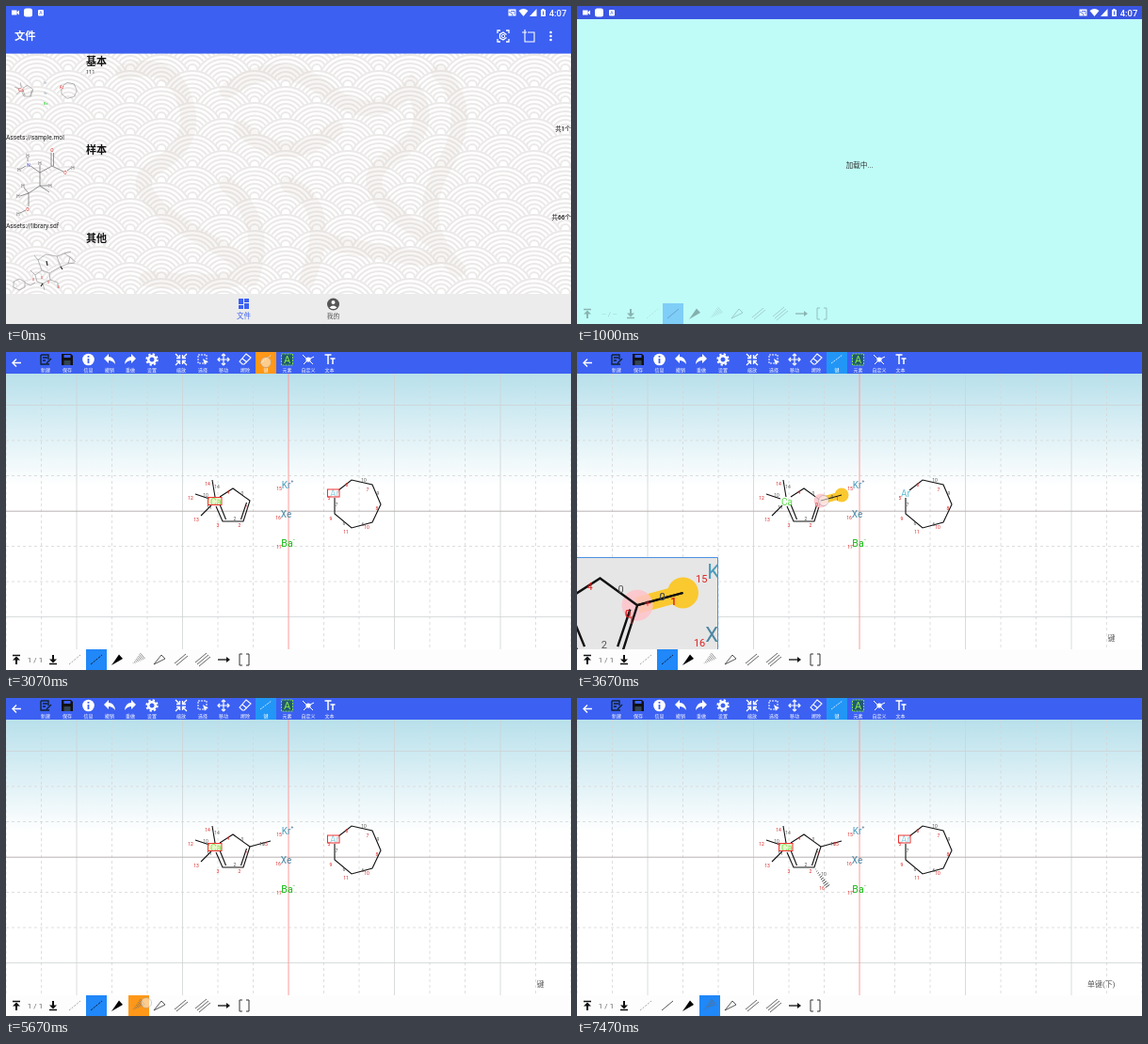
Recreate the animation shown at these times as an HTML page. Size 600 px wide and 338 px high, loop 8000 ms.

```html
<!DOCTYPE html>
<html lang="zh-CN">
<head>
<meta charset="utf-8">
<title>分子编辑器</title>
<style>
html, body { margin: 0; width: 100%; height: 100%; overflow: hidden; background: #fff; }
svg { display: block; width: 100%; height: 100%; font-family: Roboto, "Noto Sans CJK SC", "Noto Sans CJK", sans-serif; }
</style>
</head>
<body>
<svg id="stage" viewBox="0 0 600 338"></svg>
<script>
const LOOP = 8000, FPS = 15, ZOOM = 2.2;
const BLUE = '#3c60f2', PICK = '#2088f8', PRESS = '#ff9818', GOLD = '#fac82f', RED = '#d22', GREEN = '#2c2';

const text = (s, x, y, size, fill = '#111', anchor = 'middle', extra = '') =>
  `<text x="${x}" y="${y + size * 0.36}" font-size="${size}" fill="${fill}" text-anchor="${anchor}" ${extra}>${s}</text>`;
const path = (d, stroke = '#111', width = 1, extra = '') =>
  `<path d="${d}" fill="none" stroke="${stroke}" stroke-width="${width}" ${extra}/>`;
const solid = (d, fill = '#fff') => `<path d="${d}" fill="${fill}"/>`;
const rect = (x, y, w, h, fill, extra = '') =>
  `<rect x="${x}" y="${y}" width="${w}" height="${h}" fill="${fill}" ${extra}/>`;
const disc = (x, y, r, fill, extra = '') => `<circle cx="${x}" cy="${y}" r="${r}" fill="${fill}" ${extra}/>`;
const group = (id, body, extra = '') => `<g id="${id}" ${extra}>${body}</g>`;
const at = (x, y, body) => `<g transform="translate(${x} ${y})">${body}</g>`;
const range = n => [...Array(n).keys()];

// Widening strokes across the line from a to b.
function hash([ax, ay], [bx, by], half, n = 10) {
  const dx = bx - ax, dy = by - ay, len = Math.hypot(dx, dy);
  return range(n).map(i => {
    const k = (i + 1) / n, w = half * k / len, x = ax + dx * k, y = ay + dy * k;
    return `M${x - dy * w} ${y + dx * w}L${x + dy * w} ${y - dx * w}`;
  }).join('');
}

function waves() {
  const rings = range(7).flatMap(k => range(3).map(i => {
    const x = 66 * i + (k % 2 ? 33 : 0) - 33, y = 17 * k;
    return disc(x, y, 33, '#fff') + [32, 27.5, 23, 18.5, 14, 9.5, 5].map(r =>
      disc(x, y, r, 'none', 'stroke="#ebe9e8" stroke-width="2"')).join('');
  })).join('');
  return `<pattern id="waves" width="66" height="34" y="50" patternUnits="userSpaceOnUse">${rings}</pattern>`;
}

const statusBar = () =>
  rect(6, 4.5, 5.5, 5, '#fff') + solid('M11 7L14 4.5V9.5Z') + rect(19, 2.5, 9, 9, '#fff', 'rx="2.5"') +
  rect(34, 4, 6, 6.5, '#fff', 'rx="1"') + text('A', 37, 7.2, 5, BLUE) +
  rect(533.5, 3.5, 8, 7, '#fff') + path('M534 6.5A4 4 0 0 1 538 10.5M536 5.5H540V9', BLUE, .8) +
  solid('M544.5 5Q549.5 1 554.5 5L549.5 11Z') + solid('M556 11H563.5V3Z') +
  solid('M568 4H569V3H571.5V4H573V11H568Z') + path('M570.5 5.5V9.5', BLUE) +
  text('4:07', 586, 7.3, 9.5, '#fff', 'middle', 'font-weight="500"');

function row(i, title, count, file) {
  const y = 50 + 94.2 * i;
  return text(title, 85, y + 8.6, 11, '#111', 'start', 'font-weight="700"') +
    text(count, 600, y + 80.5, 6.5, '#111', 'end', 'font-weight="500"') + text(file, 0, y + 89.5, 6.7, '#222', 'start');
}

function sketches() {
  const gray = '#777';
  const first = `<g transform="translate(-58 35.7) scale(.335)" opacity=".75"><use href="#bonds"/></g>` +
    text('Ca', 16, 89, 4.5, RED) + text('Ar', 59, 86, 4.5, RED) + text('Kr', 42, 82, 3, '#89a') +
    text('Xe', 42, 93, 3, '#89a') + text('Ba', 42, 104, 4, GREEN);
  const second = path('M23 161V165M16 173L21 170M26 170L36 177V169M36 177L49 170L61 176M65 175L69 172' +
    'M48 170V156M50.5 170V156M36 177V191L24 199V213M36 191H45M36 191L46 198M24 199L15 202M24 199L19 193M21 217L15 220', gray, .8) +
    [['H', 23, 159], ['N', 24, 169, '#33b'], ['H', 14, 174], ['H', 36, 167], ['O', 49, 153, RED], ['O', 63, 177, RED],
      ['H', 71, 172], ['H', 47, 191], ['H', 18, 191], ['H', 13, 202], ['O', 23, 216, RED], ['H', 13, 221]]
      .map(([s, x, y, c]) => text(s, x, y, 4.8, c || '#555')).join('');
  const third = path('M14 290L20 293V299L14 302L8 299V293ZM20 294L26 297L31 294M33 293L31 286L38 281L46 284L47 291L39 295Z' +
    'M38 281L34 270L42 264L54 266L62 263L68 267L66 274L58 277L54 266M46 284L58 277M62 263L69 261M68 267L74 272M66 274L73 273' +
    'M47 291L55 294V300M39 295L41 302M31 286L26 281M34 270L30 265', '#888', .6) +
    path('M43 271L44 276M58 277L60 280M39 295L37 298', '#222', 1.2) +
    [[29, 291], [45, 294], [56, 299], [38, 289]].map(([x, y]) => text('O', x, y, 3, RED)).join('');
  return first + second + third;
}

function fileList() {
  const ghostly = path('M125 70Q175 55 190 100T160 170T215 250T150 290M235 90Q290 50 340 90T430 85Q460 130 410 160T440 240' +
    'T340 250M250 130Q300 175 350 130M235 190Q280 230 260 290M300 190Q350 210 320 290M460 70Q500 110 465 170T480 280',
    '#cbbcae', 17, 'opacity=".14" stroke-linecap="round"');
  return rect(0, 0, 600, 338, 'url(#waves)') + ghostly +
    row(0, '基本', '共1个', 'Assets://sample.mol') + text('111', 85, 70, 5.5, '#333', 'start') +
    row(1, '样本', '共66个', 'Assets://library.sdf') + row(2, '其他', '', '') + sketches() +
    rect(0, 50, 600, 96, '#000', 'id="rowPress" opacity="0"') +
    rect(0, 0, 600, 50.6, BLUE) + text('文件', 9, 32, 11.3, '#fff', 'start', 'font-weight="700"') +
    path('M522 29V26H525M531 26H534V29M534 35V38H531M525 38H522V35M531.5 30.5L528 28L524.5 30V34L528 36L531.5 33.5', '#fff', 1.3) +
    disc(528, 32, 1.7, 'none', 'stroke="#fff"') +
    path('M554 28H561V38H551V31M548 28H553M551 25V31', '#fff', 1.1) + [28, 32, 36].map(y => disc(578.5, y, 1.3, '#fff')).join('') +
    rect(0, 306, 600, 32, '#ececec') +
    rect(247, 311, 5, 6, BLUE) + rect(253, 311, 5, 4, BLUE) + rect(247, 318, 5, 4, BLUE) + rect(253, 316, 5, 6, BLUE) +
    text('文件', 252.5, 329, 7.5, BLUE, 'middle', 'font-weight="500"') + disc(347.5, 317, 6.5, '#555') + disc(347.5, 315, 2, '#fff') +
    solid('M343.5 320.5Q347.5 316.5 351.5 320.5Q347.5 323.5 343.5 320.5') + text('我的', 347.5, 329.3, 6.8, '#555');
}

// Bottom bar; shift widens the page counter.
function bondIcons(shift) {
  const slanted = o => `M${-6 + o} ${5 + o}L${6 + o} ${-5 + o}`;
  return at(11, 327, path('M-4 -4.5H4', '#111', 1.5) + solid('M0 -3.5L4 .5H1V5H-1V.5H-4Z', '#111')) +
    text(shift ? '-- / --' : '1 / 1', 31 + shift / 2, 327, 8, '#666') +
    at(50 + shift, 327, path('M-4 4.5H4', '#111', 1.5) + solid('M0 3.5L4 -.5H1V-5H-1V-.5H-4Z', '#111')) +
    at(73 + shift, 327, path('M-6 5L6 -5', '#999', .9, 'stroke-dasharray="2 1.5"')) +
    at(118 + shift, 327, solid('M-6 6L2 -5.5L6 -1Z', '#000')) +
    at(140 + shift, 327, path(hash([-6, 5], [5, -4], 4, 8), '#666', .7)) +
    at(163 + shift, 327, path('M-6 5L2 -5L6 -1Z', '#444', .9)) +
    at(186 + shift, 327, path(slanted(-1) + slanted(1), '#555', .9)) +
    at(209 + shift, 327, path(slanted(-2) + slanted(0) + slanted(2), '#555', .9)) +
    at(231 + shift, 327, path('M-6 0H4', '#111', 1.3) + solid('M3 -3L7 0L3 3Z', '#111')) +
    at(253 + shift, 327, path('M-2 -6H-5V6H-2M2 -6H5V6H2', '#333', 1));
}

function loading() {
  return rect(0, 0, 600, 338, '#bffcf8') + rect(0, 0, 600, 14, '#3a55e2') +
    text('加载中...', 300, 169.4, 7.7, '#333') + rect(91, 316, 22, 22, PICK, 'opacity=".4"') +
    `<g opacity=".3">${at(102, 327, path('M-6 5L6 -5', '#247'))}${bondIcons(7)}</g>`;
}

const TOOLS = [
  [42, '新建', path('M-5 -5H3V0M-5 -5V5H4M-3 -2H2M-3 1H0M1 4L6 -1', '#123', 1.4)],
  [65, '保存', solid('M-6 -6H4L6 -4V6H-6Z', '#111') + rect(-3.5, -5, 7, 3, BLUE) + rect(-3.5, 1, 7, 5, '#345')],
  [87.5, '信息', disc(0, 0, 6.3, '#fff') + path('M0 -4V-2.3M0 -1V4', BLUE, 1.8)],
  [110, '撤销', solid('M-6 -1L-1 -6V-3Q5 -3 6 5Q3 1 -1 1V4Z')],
  [132, '重做', solid('M6 -1L1 -6V-3Q-5 -3 -6 5Q-3 1 1 1V4Z')],
  [155, '设置', disc(0, 0, 3.8, 'none', 'stroke="#fff" stroke-width="2.6"') +
    disc(0, 0, 5.7, 'none', 'stroke="#fff" stroke-width="2" stroke-dasharray="2.24 2.24"')],
  [186, '缩放', path('M-6 -6L-2 -2M6 -6L2 -2M-6 6L-2 2M6 6L2 2M-5 -1.5H-1.5V-5M5 -1.5H1.5V-5M-5 1.5H-1.5V5M5 1.5H1.5V5', '#fff', 1.3)],
  [209, '选择', rect(-5, -5, 9, 9, 'none', 'stroke="#fff" stroke-dasharray="2 1"') + solid('M0 -1L6 3L3 3.5L2 6Z')],
  [231, '移动', path('M-6 0H6M0 -6V6M-4 -2L-6 0L-4 2M4 -2L6 0L4 2M-2 -4L0 -6L2 -4M-2 4L0 6L2 4', '#fff', 1.2)],
  [254, '擦除', path('M-6 2L1 -6L6 -2L-1 5H-3ZM-3 -1L2 3', '#fff', 1.1)],
  [276, '键', path('M-6 4L6 -5', '#cfe6ff', 1, 'stroke-dasharray="2 1"')],
  [298.5, '元素', rect(-6, -6, 12, 12, '#225a70', 'stroke="#7d5" stroke-dasharray="2 1"') + text('A', 0, 0, 11, '#8e4')],
  [321, '自定义', path('M-6 -5L-2 -1M2 -1L6 -3M-5 5L-2 2M2 2L5 5', '#fff') + disc(0, 0, 2.6, '#fff')],
  [343.5, '文本', path('M-5 -5H2M-1.5 -5V5M1 -1H6M3.5 -1V5', '#fff', 1.5)]
];

function grid() {
  const rule = (k, d) => path(d, k % 3 ? '#d6d6d6' : '#cfd3d5', .8, k % 3 ? 'stroke-dasharray="3 3"' : '');
  return range(17).map(i => i - 8).filter(k => k).map(k => rule(k, `M${300 + 37.5 * k} 23V316`)).join('') +
    range(7).map(i => i - 3).filter(k => k).map(k => rule(k, `M0 ${169 + 37.5 * k}H600`)).join('') +
    path('M0 169.2H600', '#b9b3b3', 1) + path('M300 23V316', '#ff9a9a', 1);
}

const BONDS = 'M227 154L241 145L259 158L252 180H230L223 164M255.5 160L249.5 178M233.5 178L227 162' +
  'M222 154L219 136M216 156L201 151M218 163L207 174M353 147L367 136L389 141L398 162L389 181L367 187L349 172V155';
const NUMBERS = [ // text, x, y, red?
  [14, 214, 140, 1], [14, 224, 143], [12, 196, 155, 1], [10, 212, 152], [13, 202, 178, 1], [11, 216, 165], [3, 225, 184, 1],
  [2, 248, 184, 1], [2, 243, 177], [0, 251, 150], [4, 236, 149, 1], [1, 256, 165, 1], [15, 290, 145, 1], [16, 289, 176, 1],
  [17, 290, 207, 1], [8, 362, 141, 1], [10, 380, 136], [7, 384, 146, 1], [9, 395, 150], [8, 394, 166, 1], [10, 383, 186, 1],
  [11, 361, 191, 1], [9, 345, 177, 1], [5, 343, 155, 1], [7, 351, 162], [6, 359, 182], [6, 379, 183]];
const num = ([s, x, y, red]) => text(s, x, y, 5, red ? RED : '#555');
const HEAD = [259, 158], TIP = [281, 152], FOOT = [252, 180], TOE = [266, 200];

const molecule = () => group('bonds', path(BONDS, '#111', 1.1)) + NUMBERS.map(num).join('') +
  text('Ca', 223, 159, 10, '#5d4') + text('Kr', 297.5, 141.5, 10, '#4a9cbd') + text('+', 304, 137, 5, '#357') +
  text('Xe', 297.5, 172, 10, '#4a87a3') + text('Ba', 298.5, 203.5, 10.5, '#1b1') + text('−', 306, 199, 5, '#181') +
  text('Ar', 349, 150.5, 10, '#62bdd6') +
  group('bondA', path(`M${HEAD}L${TIP}`, '#111', 1.1) + num([10, 272, 155]) + num([15, 275, 155, 1])) +
  group('bondB', path(hash(FOOT, TOE, 2.8), '#333', .9) + num([10, 262, 187]) + num([16, 260, 202, 1]));

const editor = () =>
  rect(0, 0, 600, 338, '#fff') + rect(0, 23, 600, 120, 'url(#sky)') + grid() + group('mol', molecule()) +
  group('boxes', rect(214.5, 154.5, 14.5, 8, '#c8f080', 'fill-opacity=".4" stroke="#e33"') +
    rect(341.5, 146, 12.5, 8, '#fff', 'fill-opacity=".3" stroke="#e33"')) +
  group('ghost', '') +
  group('lens', rect(0, 218, 150, 98, '#e6e6e6') +
    `<g clip-path="url(#lensClip)"><g id="lensView"><use href="#ghost"/><use href="#mol"/><use href="#ghostInk"/></g></g>` +
    path('M72 267H78M75 264V270', '#f22', .8) + path('M0 218.5H149.5V316', '#4d90e0', 1)) +
  text('', 571.5, 304, 8, '#555', 'end', 'id="toolName"') +
  rect(0, 316, 600, 22, '#fdfdfd') + rect(85, 316, 22, 22, PICK, 'id="cell"') + rect(130, 316, 22, 22, PRESS, 'id="pressCell"') +
  `<path id="plain" d="M90 332L102 322" stroke-width="1"/>` + bondIcons(0) +
  rect(0, 0, 600, 23, BLUE) + rect(265, 0, 22, 23, PICK, 'id="bondTool"') + path('M16 11.5H7M11 7.5L7 11.5L11 15.5', '#fff', 1.4) +
  TOOLS.map(([x, name, icon]) => at(x, 8, icon) + text(name, x, 19, 5, '#fff', 'middle', 'font-weight="500"')).join('');

document.getElementById('stage').innerHTML = `<defs>${waves()}
  <linearGradient id="sky" x2="0" y2="1"><stop stop-color="#b8e0eb"/><stop offset="1" stop-color="#fff"/></linearGradient>
  <clipPath id="lensClip"><rect y="219" width="149" height="97"/></clipPath></defs>` +
  group('list', fileList()) + group('loading', loading()) + group('status', statusBar()) + group('editor', editor()) +
  disc(0, 0, 5.5, '#fff', 'id="touch" fill-opacity=".5" stroke="#999" stroke-opacity=".6" stroke-width=".8"');

const $ = id => document.getElementById(id);
const show = (id, on) => $(id).setAttribute('display', on ? 'inline' : 'none');
const set = (id, attrs) => Object.entries(attrs).forEach(([k, v]) => $(id).setAttribute(k, v));
const clamp = v => Math.max(0, Math.min(1, v));

function along(points, t) {
  const i = points.findIndex(p => p[0] > t);
  if (i < 0) return points[points.length - 1].slice(1);
  if (i === 0) return points[0].slice(1);
  const [t0, x0, y0] = points[i - 1], [t1, x1, y1] = points[i], k = (t - t0) / (t1 - t0);
  return [x0 + (x1 - x0) * k, y0 + (y1 - y0) * k];
}

const DRAGS = [
  { from: 3400, to: 4200, snap: 3600, atom: HEAD, end: TIP, wedge: false,
    points: [[3400, 276, 174], [3530, 269, 163], [3670, 264, 157], [3740, 262, 158]] },
  { from: 6470, to: 7330, snap: 6930, atom: FOOT, end: TOE, wedge: true,
    points: [[6470, 236, 212], [6730, 241, 205], [6870, 246, 197], [6935, 249, 186], [7070, 253, 181]] }
];
const TAPS = [[3000, 3200, 276, 11], [5670, 5870, 149, 324]];

function drawDrag(drag, t) {
  const finger = along(drag.points, t), snapped = t >= drag.snap;
  const a = snapped ? drag.atom : finger;
  const b = snapped ? drag.end : [a[0] + 20, a[1] + 11];
  const mid = [(a[0] + b[0]) / 2, (a[1] + b[1]) / 2];
  const ink = drag.wedge ? path(hash(a, b, 2.8, 16), '#222', .7) : path(`M${a}L${b}`, '#111', 1);
  $('ghost').innerHTML = path(`M${a}L${b}`, GOLD, 8) + disc(...b, 7.5, GOLD) +
    disc(...a, 7.5, snapped ? '#ffc4ca' : GOLD, snapped ? 'opacity=".85"' : '') +
    group('ghostInk', ink + num([0, a[0] - 4.5, a[1] + 4, 1]) + num([0, mid[0] + 1, mid[1] - 1]) + num([1, b[0] - 4.5, b[1] + 4, 1]));
  set('lensView', { transform: `translate(75 267) scale(${ZOOM}) translate(${-finger[0]} ${-finger[1]})` });
}

function drawTouch(t, drag) {
  const tap = TAPS.find(([from, to]) => t >= from && t < to);
  const spot = drag ? along(drag.points, t + 67) : tap && tap.slice(2);
  show('touch', spot);
  if (spot) set('touch', { cx: spot[0], cy: spot[1] });
}

function render(time) {
  const t = Math.floor((time + 5) * FPS / 1000) * 1000 / FPS + 5;
  const editing = t >= 1730;
  show('editor', editing);
  show('list', !editing);
  show('loading', !editing && t >= 500);
  show('status', !editing);

  const rise = 1 - clamp((t - 510) / 380);
  set('loading', { opacity: clamp((t - 510) / 205), transform: `translate(0 ${Math.round(27 * rise * rise)})` });
  set('rowPress', { opacity: 0.07 * clamp((t - 270) / 200) });

  const drag = DRAGS.find(d => t >= d.from && t < d.to);
  if (drag) drawDrag(drag, t);
  show('ghost', drag);
  show('lens', drag);
  show('boxes', !drag);
  show('bondA', t >= DRAGS[0].to);
  show('bondB', t >= DRAGS[1].to);
  drawTouch(t, drag);

  const hashed = t >= 5870;
  show('pressCell', t >= 5670 && !hashed);
  show('bondTool', t >= 3000);
  set('bondTool', { fill: t < 3200 ? PRESS : '#2296f6' });
  set('cell', { x: hashed ? 130 : 85 });
  set('plain', { stroke: hashed ? '#555' : '#124', 'stroke-dasharray': hashed ? 'none' : '2.5 1' });
  $('toolName').textContent = t < 3200 ? '' : hashed ? '单键(下)' : '键';
}

function tick() {
  render(performance.now() % LOOP);
  requestAnimationFrame(tick);
}
tick();
</script>
</body>
</html>
```
